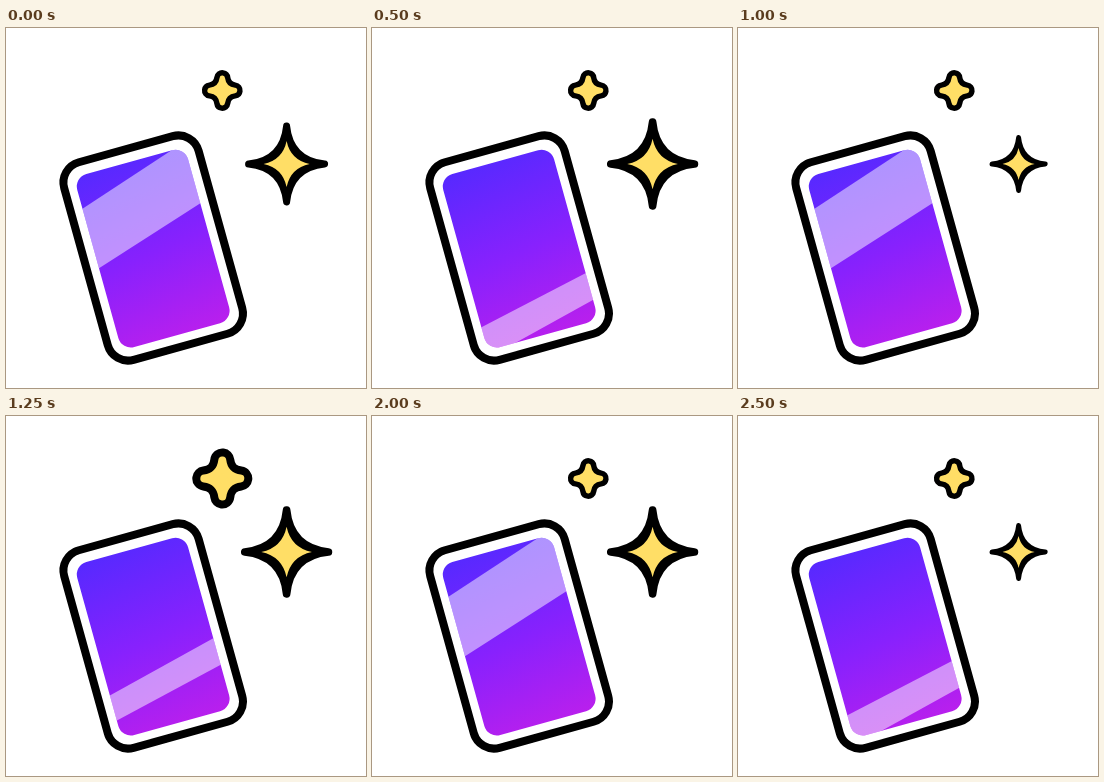
These frames come from a looping animation (360 by 360 pixels, 2.75 s). An HTML page:

```html
<!DOCTYPE html>
<html lang="en">
<head>
<meta charset="utf-8">
<title>Shiny card</title>
<style>
  html, body { margin: 0; width: 100%; height: 100%; overflow: hidden; background: #fff; }
  svg { display: block; width: 100vw; height: 100vh; }
</style>
</head>
<body>
<svg viewBox="0 0 360 360">
  <defs>
    <linearGradient id="ink" gradientUnits="userSpaceOnUse" x1="108" y1="122" x2="198" y2="322">
      <stop offset="0" stop-color="#522aff"/>
      <stop offset=".5" stop-color="#8821fd"/>
      <stop offset="1" stop-color="#c21fea"/>
    </linearGradient>
    <clipPath id="panel">
      <rect x="-57.5" y="-89.8" width="115" height="179.6" rx="13"
            transform="translate(147.2 220.6) rotate(-15.5)"/>
    </clipPath>
  </defs>
  <rect x="-69.75" y="-102.5" width="139.5" height="205" rx="21"
        transform="translate(147.2 220) rotate(-15.5)"
        fill="#fff" stroke="#000" stroke-width="8"/>
  <g clip-path="url(#panel)">
    <rect width="360" height="360" fill="url(#ink)"/>
    <path id="shine" fill="#fff" fill-opacity=".5"/>
  </g>
  <g id="puff" stroke-linejoin="round">
    <path class="puff" fill="#000" stroke="#000" stroke-width="24"/>
    <path class="puff" fill="#ffde66" stroke="#ffde66" stroke-width="8"/>
  </g>
  <g id="spark" stroke-linejoin="round">
    <path id="rim" fill="#000" stroke="#000" stroke-width="7"/>
    <path id="core" fill="#ffde66"/>
  </g>
</svg>
<script>
const STEP = 250, STEPS = 11;
const $ = id => document.getElementById(id);

// Four-pointed star: tip distance r, concave control offset c.
const star = (r, c) =>
  `M0 ${-r}Q${c} ${-c} ${r} 0Q${c} ${c} 0 ${r}Q${-c} ${c} ${-r} 0Q${-c} ${-c} 0 ${-r}Z`;

// Slanted band: upper edge left/right, lower edge left/right.
const band = (a, b, c, d) => `M60 ${a}L230 ${b}V${d}L60 ${c}Z`;

const bands = [
  band(191.5, 80, 261.4, 152.4),
  band(303.8, 209.8, 331.9, 240.4),
  band(325, 236.7, 361, 267),
  ''
];
const sparkScale = [1, 0.7, 1.1];
const puffScale = [0.68, 1];

document.querySelectorAll('path.puff').forEach(p => p.setAttribute('d', star(18, 2)));
$('rim').setAttribute('d', star(38, 3.5));
$('core').setAttribute('d', star(23, 4));

const place = (id, x, y, s) =>
  $(id).setAttribute('transform', `translate(${x} ${y}) scale(${s})`);

function draw(ms) {
  const n = Math.floor(ms / STEP) % STEPS;
  $('shine').setAttribute('d', bands[n % 4]);
  place('puff', 216.3, 62.5, puffScale[n % 2]);
  place('spark', 280.6, 136, sparkScale[n % 3]);
}

const start = performance.now();
function tick() {
  draw(performance.now() - start);
  requestAnimationFrame(tick);
}
tick();
</script>
</body>
</html>
```
